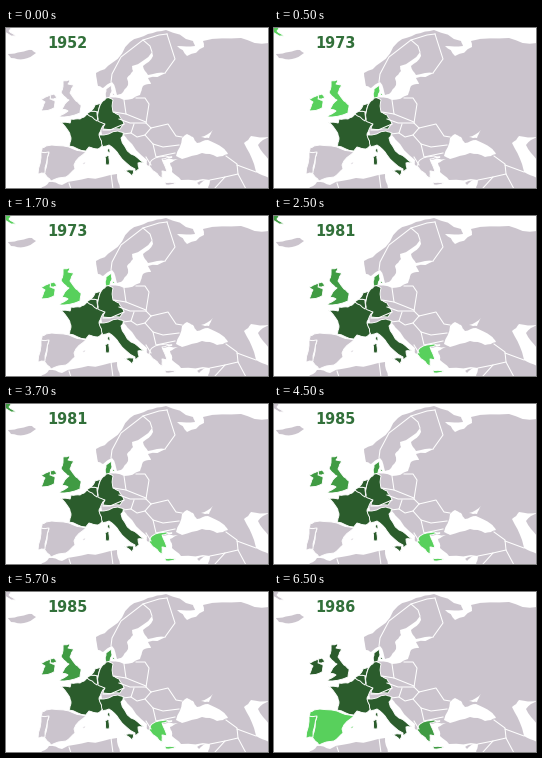
A matplotlib script that plays this animation: 262 px wide and 160 px high, repeating every 8 s.

```python
import random

import matplotlib.pyplot as plt
from matplotlib.animation import FuncAnimation
from matplotlib.patches import Polygon

W, H, DPI = 262, 160, 100
STEP, LOOP = 500, 8000
LAND, SEA = "#cbc4cd", "white"
DARK, MID, LIGHT = "#2b5c2c", "#409b43", "#58d05c"
TITLE = "#32703a"

# Coordinates are stage pixels, y pointing down; roughen() adds coastal detail.
NORTH_COAST = [
    (100, 70), (118, 72), (134, 67), (137, 58), (145, 56), (142, 50),
    (160, 45), (142, 47), (137, 38), (147, 28), (146, 24), (126, 38),
    (127, 43), (121, 50), (122, 57), (115, 66), (111, 67), (106, 54),
    (97, 60), (92, 58), (90, 45), (106, 35), (124, 14), (142, 6),
    (160, 2), (187, 13), (189, 18), (171, 18), (181, 28), (198, 19),
    (197, 13), (235, 10), (263, 15),
]
SOUTH_COAST = [
    (263, 161), (202, 161), (204, 152), (175, 152), (166, 144), (164, 135),
    (172, 131), (154, 132), (150, 142), (141, 137), (141, 132), (121, 111),
    (118, 107), (96, 107), (94, 80),
]
BLACK_SEA = [
    (176, 110), (181, 106), (187, 109), (191, 115), (202, 112), (217, 120),
    (222, 126), (211, 129), (196, 125), (176, 131), (170, 128),
]
CASPIAN = [
    (238, 115), (245, 108), (263, 109), (252, 117), (263, 132), (263, 150),
    (250, 144), (248, 136),
]
AFRICA = [(34, 161), (43, 154), (56, 157), (82, 150), (111, 146), (114, 161)]
ICELAND = [(2, 26), (15, 24), (26, 22), (30, 25), (18, 31), (5, 30)]
AZOV = [(195, 109), (207, 102), (203, 110)]
CYPRUS = [(191, 155), (199, 152), (193, 157)]

BORDERS = [
    # Nordic countries
    [(105, 54), (106, 46), (115, 29), (137, 12), (153, 7), (161, 6)],
    [(146, 24), (144, 18), (137, 12)],
    [(161, 6), (169, 31), (159, 45)],
    # Central Europe
    [(118, 72), (120, 86), (140, 94)],
    [(130, 70), (139, 70), (143, 76), (140, 95)],
    [(108, 84), (120, 86)],
    [(113, 91), (124, 95), (140, 95), (145, 100)],
    [(97, 102), (104, 102), (118, 96)],
    [(117, 106), (125, 105), (128, 96)],
    [(125, 105), (131, 109), (139, 107), (145, 100)],
    # Balkans
    [(145, 100), (162, 96), (170, 108), (176, 109)],
    [(139, 107), (147, 116), (157, 119), (173, 117)],
    [(147, 116), (150, 129), (169, 125)],
    [(140, 129), (145, 137)],
    # Near East and Africa
    [(220, 128), (231, 136), (232, 146), (240, 161)],
    [(204, 152), (219, 149), (232, 146)],
    [(231, 137), (250, 144)],
    [(219, 149), (209, 160)],
    [(63, 155), (65, 161)],
    [(105, 146), (107, 161)],
]

SIX = [
    [(54, 94), (64, 95), (65, 91), (74, 91), (81, 86), (99, 96), (93, 106),
     (97, 117), (92, 121), (83, 119), (80, 123), (63, 118), (65, 111),
     (63, 104)],
    [(81, 86), (85, 83), (91, 84), (91, 93)],
    [(85, 83), (89, 77), (95, 75), (92, 84)],
    [(96, 74), (101, 69), (107, 72), (107, 84), (113, 87), (118, 96),
     (114, 101), (97, 101), (99, 96), (92, 93), (92, 85)],
    [(93, 107), (112, 103), (118, 105), (115, 110), (125, 126), (138, 135),
     (132, 135), (133, 141), (129, 145), (129, 141), (113, 127), (103, 117),
     (97, 119)],
    [(118, 142), (128, 142), (126, 148)],
    [(99, 129), (103, 127), (103, 137), (100, 137)],
    [(101, 122), (104, 120), (104, 126)],
]
NORTH_SEA = [
    [(57, 53), (64, 52), (62, 56), (68, 57), (64, 65), (70, 73), (75, 77),
     (74, 85), (53, 89), (62, 83), (56, 81), (63, 72), (59, 69), (55, 64)],
    [(44, 67), (48, 66), (51, 70), (44, 71)],
    [(44, 67), (44, 71), (49, 73), (48, 80), (35, 83), (39, 74), (35, 71)],
    [(100, 61), (105, 57), (106, 63), (104, 69), (100, 70)],
    [(106, 66), (109, 65), (108, 69)],
]
GREENLAND = [
    [(-1, -1), (7, -1), (3, 3), (10, 8), (5, 8), (-1, 4)],
]
GREECE = [
    [(143, 138), (146, 132), (160, 128), (166, 129), (156, 131), (161, 144),
     (156, 143), (157, 152), (149, 144)],
    [(158, 154), (170, 155), (160, 157)],
]
IBERIA = [
    [(36, 120), (40, 118), (63, 119), (80, 124), (68, 137), (69, 141),
     (60, 149), (45, 153), (38, 145), (43, 125), (35, 124)],
    [(35, 124), (43, 124), (39, 145), (32, 146)],
    [(75, 137), (79, 134), (81, 136)],
]

# start ms, year, then colours of: north sea, greenland, greece, iberia
STAGES = [
    (0, "1952", LAND, LAND, LAND, LAND),
    (500, "1973", LIGHT, LIGHT, LAND, LAND),
    (2500, "1981", MID, MID, LIGHT, LAND),
    (4500, "1985", MID, LAND, LIGHT, LAND),
    (6500, "1986", DARK, LAND, MID, LIGHT),
]

fig = plt.figure(figsize=(W / DPI, H / DPI), dpi=DPI, facecolor=SEA)
ax = fig.add_axes([0, 0, 1, 1])
ax.set_xlim(0, W)
ax.set_ylim(H, 0)
ax.axis("off")


def roughen(points, amount=0.09, depth=2):
    """Shift edge midpoints sideways; a shared edge always bends the same way."""
    for _ in range(depth):
        detailed = []
        for a, b in zip(points, points[1:] + points[:1]):
            (x0, y0), (x1, y1) = sorted((a, b))
            shift = random.Random(f"{x0},{y0},{x1},{y1}").uniform(-amount, amount)
            mid = ((x0 + x1) / 2 + shift * (y1 - y0),
                   (y0 + y1) / 2 - shift * (x1 - x0))
            detailed += [a, mid]
        points = detailed
    return points


def shape(points, color, edge="none"):
    patch = Polygon(roughen(points), closed=True, facecolor=color,
                    edgecolor=edge, linewidth=0.65, joinstyle="round")
    return ax.add_patch(patch)


def group(outlines, color=LAND):
    return [shape(points, color, SEA) for points in outlines]


for land in (NORTH_COAST + SOUTH_COAST, AFRICA, ICELAND, CYPRUS):
    shape(land, LAND)
for water in (BLACK_SEA, AZOV, CASPIAN):
    shape(water, SEA)
for line in BORDERS:
    ax.plot(*zip(*line), color=SEA, linewidth=0.75, solid_joinstyle="round")

group(SIX, DARK)
joiners = [group(g) for g in (NORTH_SEA, GREENLAND, GREECE, IBERIA)]
year = ax.text(41.5, 20, "", color=TITLE, family="DejaVu Sans", weight="bold",
               fontsize=14.5 * 72 / DPI, va="baseline")


def update(frame):
    now = frame * STEP
    _, label, *colors = [s for s in STAGES if s[0] <= now][-1]
    year.set_text(label)
    for patches, color in zip(joiners, colors):
        for patch in patches:
            patch.set_facecolor(color)
    return [year, *sum(joiners, [])]


anim = FuncAnimation(fig, update, frames=LOOP // STEP, interval=STEP,
                     repeat=True, repeat_delay=0, blit=False)
plt.show()
```
